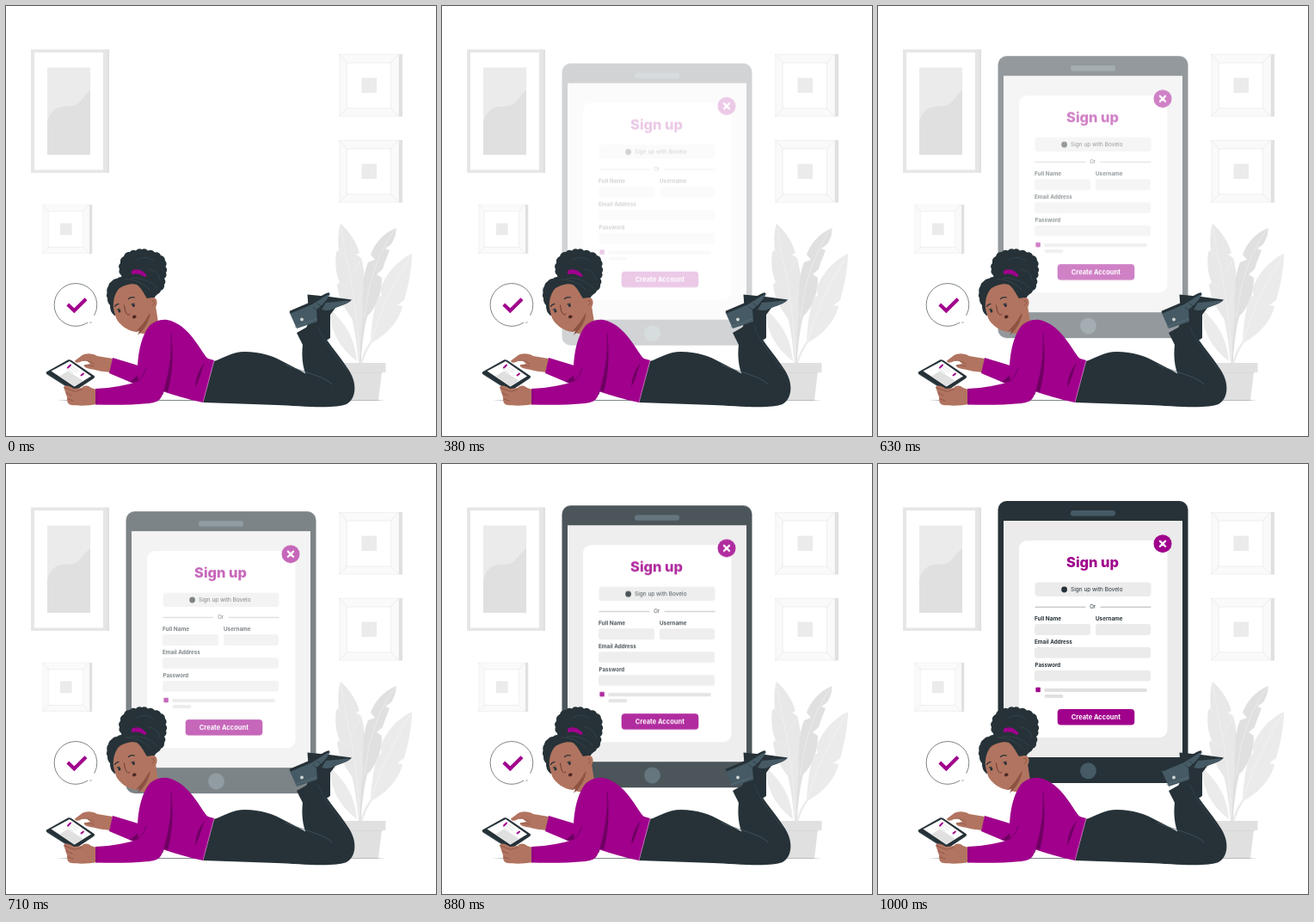
An HTML page with a canvas that plays this animation: 500x500 px, repeating every 1040 ms.

```html
<!DOCTYPE html>
<html lang="en">
<head>
<meta charset="utf-8">
<title>Sign up</title>
<style>
html, body { margin: 0; width: 100%; height: 100%; overflow: hidden; background: #fff; }
canvas { display: block; width: 500px; height: 500px; }
</style>
</head>
<body>
<canvas id="stage"></canvas>
<script>
const SIZE = 500, LOOP = 1040, START = 170, STEP = 41.5, RISE = 30;
const INK = '#263238', SLATE = '#455a64', PLUM = '#a0008c', PLUM_DARK = '#6e0061';
const SKIN = '#b17460', SKIN_DARK = '#8a5140', PALE = '#ebebeb', GREY = '#e0e0e0';
const FONT = 'Inter, "Open Sans", sans-serif';
const dpr = Math.max(1, window.devicePixelRatio || 1);

let c; // context being drawn on

function setup(canvas) {
  canvas.width = canvas.height = Math.round(SIZE * dpr);
  const ctx = canvas.getContext('2d');
  ctx.scale(dpr, dpr);
  ctx.lineCap = ctx.lineJoin = 'round';
  return ctx;
}

function layer(draw) {
  const canvas = document.createElement('canvas');
  c = setup(canvas);
  draw();
  return canvas;
}

function fill(d, color) {
  c.fillStyle = color;
  c.fill(new Path2D(d));
}

function line(d, color, width = 1) {
  c.strokeStyle = color;
  c.lineWidth = width;
  c.stroke(new Path2D(d));
}

// Box given by its left, top, right and bottom edges
function box(l, t, r, b, color, radius = 0) {
  c.fillStyle = color;
  c.beginPath();
  c.roundRect(l, t, r - l, b - t, radius);
  c.fill();
}

function oval(x, y, rx, ry, color, turn = 0) {
  c.fillStyle = color;
  c.beginPath();
  c.ellipse(x, y, rx, ry, turn, 0, Math.PI * 2);
  c.fill();
}

const dot = (x, y, r, color) => oval(x, y, r, r, color);

function text(str, x, y, size, weight, color, align = 'left') {
  c.font = `${weight} ${size}px ${FONT}`;
  c.textAlign = align;
  c.fillStyle = color;
  c.fillText(str, x, y);
}

// Clockwise outline whose sides bulge outwards like curls
function curly(points, bulge = .55) {
  c.fillStyle = INK;
  c.beginPath();
  c.moveTo(...points[0]);
  points.forEach(([x, y], i) => {
    const [u, v] = points[(i + 1) % points.length];
    c.quadraticCurveTo((x + u) / 2 + (v - y) * bulge, (y + v) / 2 - (u - x) * bulge, u, v);
  });
  c.fill();
}

function smallFrame(x, y, s) {
  c.save();
  c.translate(x, y);
  c.scale(s, s);
  box(69, 0, 73.5, 72.5, GREY);
  box(0, 0, 69, 72.5, '#fafafa');
  line('M0 .4H69 M0 72.1H69 M.4 0V72', '#f0f0f0', .8);
  box(9, 10, 60, 63, '#fff');
  line('M9 10H60V63H9Z', '#e8e8e8', .7);
  line('M0 0L9 10 M69 0L60 10 M0 72.5L9 63 M69 72.5L60 63', '#e6e6e6', .7);
  box(26, 27.5, 43.5, 45, PALE);
  c.restore();
}

function poster() {
  box(113, 50.5, 120, 194, GREY);
  box(29, 50.5, 117.5, 194, '#e6e6e6');
  box(33, 54, 113, 190.5, '#fff');
  box(48, 71.5, 98, 173, PALE);
  fill('M48 136C50 124 57 118 66 117C76 116 80 118 87 110C91 105 94 101 98 98V173H48Z', GREY);
}

function plant() {
  fill('M376 352C377 376 386 396 408 413C406 394 401 374 376 352Z', PALE);
  fill('M389 253C386 263 386 272 387 284L384 286C382 300 384 312 388 321L385 324C387 341 394 352 402 363C406 376 408 396 410 416H413C412 392 416 372 416 348C419 328 417 306 413 293L407 289L411 287C407 273 399 262 389 253Z', '#e8e8e8');
  line('M390 258C394 295 408 330 411 414', '#f2f2f2', .7);
  fill('M453.5 258C437 265 428 278 424 289L429 295L421 298C414 315 414 340 415 358C413 375 412 395 411 416H412.5C414 396 416 376 420 361C431 350 437 335 437 316L431 312L438 306C440 298 444 290 446 284L441 282L448 277C452 270 454 264 453.5 258Z', GREY);
  line('M452 260C430 292 421 325 417 361', '#efefef', .7);
  fill('M472 288C455 296 441 312 435 330L437 336L432 340C427 355 425 372 424 390C418 398 414 406 412 416H414C418 404 421 398 426 391C442 383 458 365 461 349L455 348L463 342C468 325 472 305 472 288Z', PALE);
  line('M470 291C450 325 434 355 425 390', '#f5f5f5', .7);
  line('M398 300L387 285 M401 315L413 294 M403 330L388 321 M407 350L416 330', '#f2f2f2', .5);
  fill('M385 425H437L433 458.5H391Z', GREY);
  box(380, 415, 441.5, 426, GREY);
  line('M386 426.5H437', '#d6d6d6', .8);
}

function room() {
  box(0, 0, SIZE, SIZE, '#fff');
  poster();
  smallFrame(387.5, 56, 1);
  smallFrame(387.5, 156, 1);
  smallFrame(42.5, 231, .785);
  plant();
  oval(250, 458.5, 195, .5, '#7d8589');
}

function tablet() {
  box(139.5, 43, 360.5, 371, INK, 10);
  box(146, 66, 354, 341, PALE);
  box(224, 54, 276, 60.5, SLATE, 3);
  dot(244.5, 356.8, 9.5, SLATE);
  box(164, 89, 336.5, 318, '#fff', 9);
  dot(331, 92.7, 10.5, PLUM);
  line('M327.9 89.6L334.1 95.8 M334.1 89.6L327.9 95.8', '#fff', 2.2);
  text('Sign up', 249.5, 119.5, 16.4, 800, PLUM, 'center');

  box(182.5, 137.5, 317.5, 154, PALE, 4);
  dot(216.6, 146, 3.4, INK);
  text('Sign up with Bovelo', 224, 148.1, 6.5, 400, INK);
  line('M183 166.3H241 M259 166.3H317', '#7d8488', .6);
  text('Or', 249.7, 168.2, 6, 400, INK, 'center');

  text('Full Name', 182, 181.5, 6.5, 700, INK);
  text('Username', 253, 181.5, 6.3, 700, INK);
  box(182, 186, 247, 199, PALE, 3);
  box(253, 186, 317, 199, PALE, 3);
  text('Email Address', 182, 209.3, 6.3, 700, INK);
  box(182, 213, 317, 225.7, PALE, 3);
  text('Password', 182.5, 236.2, 6.2, 700, INK);
  box(182, 240, 317, 252.5, PALE, 3);

  box(183.4, 259.8, 188.8, 265.2, PLUM, .8);
  box(193, 261, 313, 265, GREY, 2);
  box(193.5, 268, 215.5, 272, GREY, 2);
  box(208.7, 285, 298.3, 303.5, PLUM, 4);
  text('Create Account', 253.3, 296.5, 7.5, 700, '#fff', 'center');
}

function bubble() {
  dot(81, 347.5, 25, '#fff');
  c.strokeStyle = INK;
  c.lineWidth = .6;
  c.beginPath();
  c.arc(81, 347.5, 24.9, .98, Math.PI * 2 + .5);
  c.stroke();
  line('M97.5 368.2L99.5 367.9', INK, .4);
  c.lineCap = 'butt';
  c.lineJoin = 'miter';
  line('M71.8 347L79.3 354.3L93 340.7', PLUM, 4.1);
  c.lineCap = c.lineJoin = 'round';
}

function legs() {
  // far leg and shoe
  fill('M350 372L346 386C343 404 344 420 351 434L392 440L371 390L377 386V356H358Z', INK);
  fill('M350.5 335.5L376 338L402 341.5C400 345 391 348 383 351L377 359L352 357Z', INK);
  fill('M372 345L401 342.3C397 346.5 389 348.5 382 351C378 354 374 355 367 353Z', SLATE);
  // near leg
  fill('M242 413C252 410 262 402 278 402C296 402 311 407 325 415C335 420 344 425 353 430C357 415 346 396 338 380L361 367C369 387 388 406 399 424C408 438 408 456 396 463C382 469 340 465 315 464L229 461Z', INK);
  line('M325 417C338 423 352 426 364 431C370 433 375 436 379 440', '#4a5c65', .7);
  line('M363 373C369 390 383 406 396 423', '#3d4f58', .5);
  // near shoe
  fill('M329.5 356L353 347C361 343 367 337 374 334L377 334.5C374 341 368 348 361 353L362 367L338 375Z', SLATE);
  fill('M329.5 354.8L350 346C358 343 366 336 375.5 333L376 335C369 338 363 343 356 347L331 357.5Z', INK);
  line('M336 373L361 364', '#607580', .7);
  line('M357 350L362 354 M362 346L366 349', INK, .7);
  dot(344, 364.5, 1.9, '#cfd5d7');
}

function farArm() {
  fill('M124 410L106 407C101 403.5 92 403.5 88 406.5L80 412.5C80.5 415.5 84 415.5 89 412.5L94 412.5L98 416L91 417.5C90 420 95 422 101 422.5C108 424.5 114 425 121 426Z', SKIN);
  line('M89 412.5C94 411 98 414 102 416 M91 418C95 417.5 99 418 102 419', SKIN_DARK, .7);
  fill('M124 409L157 419L158 439L146 438L120 427Z', PLUM);
  fill('M155 428L144 437L158 440Z', PLUM_DARK);
}

function torso() {
  fill('M163 354L173 342L177 368L164 382L154 380Z', SKIN);
  fill('M168 357C166 368 160 377 153 383L156 376Z', SKIN_DARK);
  fill('M166 373C173 365 184 363 193 366.5C205 371 214 381 221 391C227 399 231 407 235 410L242 412L229 461C214 458 197 453 182 448Z', PLUM);
  fill('M192 380C193 400 192 419 184 447L188 449C194 428 195 400 192 380Z', PLUM_DARK);
  fill('M231 415C224 423 221 432 220 443C225 436 227 424 231 415Z', PLUM_DARK);
  line('M242 412L229 461', '#c66abb', .8);
}

function pad() {
  fill('M47 425.5L72 411.5C73.5 411 75 411.5 76 412L102.5 430C103.5 431 103 432 102 433L81 447C79.5 448 78 447.5 77 447L48 428.5C46.5 427.5 46.5 426.5 47 425.5Z', INK);
  fill('M52.5 424.5L74 413L99 430.5L79.5 442.5Z', '#fff');
  fill('M62 430.5L72 424.5L90 436L79.5 442.5Z', GREY);
  line('M71 422L78 427 M74 420L82 426 M77 419L84 424', '#d0d3d4', .7);
  line('M72 420.5L75 417.5 M87.5 429.5L90 427.5', PLUM, 2);
  line('M48 428L78 447', SLATE, .7);
}

function nearArm() {
  fill('M67 443C70 440 74 442 79 445L88 444C91 440.5 96 441 99 444L105 446V463C97 465 84 465 76 464C71 463 71 459 71 455Z', SKIN);
  line('M68 444L79 448C81 449 84 447 88 446 M70 450L77 453 M72 457L78 459', SKIN_DARK, .8);
  fill('M104 445C124 444 141 441 154 436C151 417 155 387 166 373C175 363 191 366 192 381C194 405 190 432 181 454C178 460 173 461 167 462C147 464 124 464 104 463.5Z', PLUM);
  line('M154 436C158 432 161 427 163 421', PLUM_DARK, .9);
  line('M192 381C193.5 405 189 432 182 452', PLUM_DARK, .8);
  line('M106 446L105.5 463', PLUM_DARK, .6);
}

function head() {
  // crown, then bun
  curly([[126, 360], [121, 348], [118, 340], [117.5, 333], [119, 326], [123, 320], [129, 317],
    [135, 315], [142, 315], [158, 316], [178, 330], [174, 337], [168, 342], [150, 345]], .25);
  curly([[133, 299], [137, 291], [144, 286], [151, 284.5], [158, 283], [165, 284.5], [173, 286.5],
    [180, 290], [185, 296], [185.5, 303], [186, 310], [184, 317], [184, 324], [180, 331],
    [174, 335], [166, 337], [150, 328], [139, 319], [134, 313], [132, 306]], .4);
  // face and ear
  fill('M126 356C123 346 126 335 131 329C136 325 146 322 152 324C157 327 160 334 164 340L170 339C176 338 177 346 174 350C172 353 169 354 167 356C164 368 159 377 151 379C142 378 132 371 128 363Z', SKIN);
  line('M170 342.5C173 342 173.5 346 170 349', SKIN_DARK, .8);
  fill('M167 356C164 368 158 378 151 379C157 372 163 366 167 356Z', SKIN_DARK);
  // features
  oval(131.8, 354.5, 1.5, 2, INK, -.3);
  oval(148.3, 348, 1.5, 2, INK, -.3);
  line('M126.5 349.5C127.5 347 129.5 346.5 131 346.3 M142.5 340.5C144.5 338.4 147 338.2 149.5 339', INK, 1.2);
  line('M129 353L132 352 M145.5 347L149 345.8', INK, .8);
  line('M137.5 348C138 352 138.5 355 140.5 358C141.5 359.5 143.5 359.5 144 358', '#693b30', 1);
  fill('M147 361C148.5 359 150.5 359.3 151.7 360.7C151.3 363 149 363.7 147.4 363Z', '#4a2722');
  // hair band and strands
  fill('M146 308C152 304 160 307 164 314L161 315C156 311 151 311 146 312Z', PLUM);
  line('M145 317C155 315 168 319 176 328 M139 318C150 318 160 322 167 330 M151 296C157 291 166 291 172 297 M166 306C173 307 178 312 179 318', '#3d4d55', .6);
}

function person() {
  bubble();
  legs();
  farArm();
  torso();
  pad();
  nearArm();
  head();
}

// Progress of the rise, keyed by time
const KEYS = [[170, .06], [250, .115], [380, .213], [540, .388], [710, .598], [880, .833], [1000, 1]];

function progress(t) {
  if (t < START) return 0;
  const k = Math.floor((t - START + 4) / STEP);
  const at = Math.min(START + k * STEP, 1000);
  let i = 1;
  while (KEYS[i][0] < at) i++;
  const [t0, p0] = KEYS[i - 1], [t1, p1] = KEYS[i];
  return p0 + (p1 - p0) * (at - t0) / (t1 - t0);
}

const back = layer(room), device = layer(tablet), front = layer(person);
const view = setup(document.getElementById('stage'));
const put = (img, y = 0) => view.drawImage(img, 0, y, SIZE, SIZE);
const begin = performance.now();

function frame() {
  const p = progress((performance.now() - begin) % LOOP);
  put(back);
  if (p > 0) {
    view.globalAlpha = p;
    put(device, RISE * (1 - p));
    view.globalAlpha = 1;
  }
  put(front);
  requestAnimationFrame(frame);
}
frame();
</script>
</body>
</html>
```
